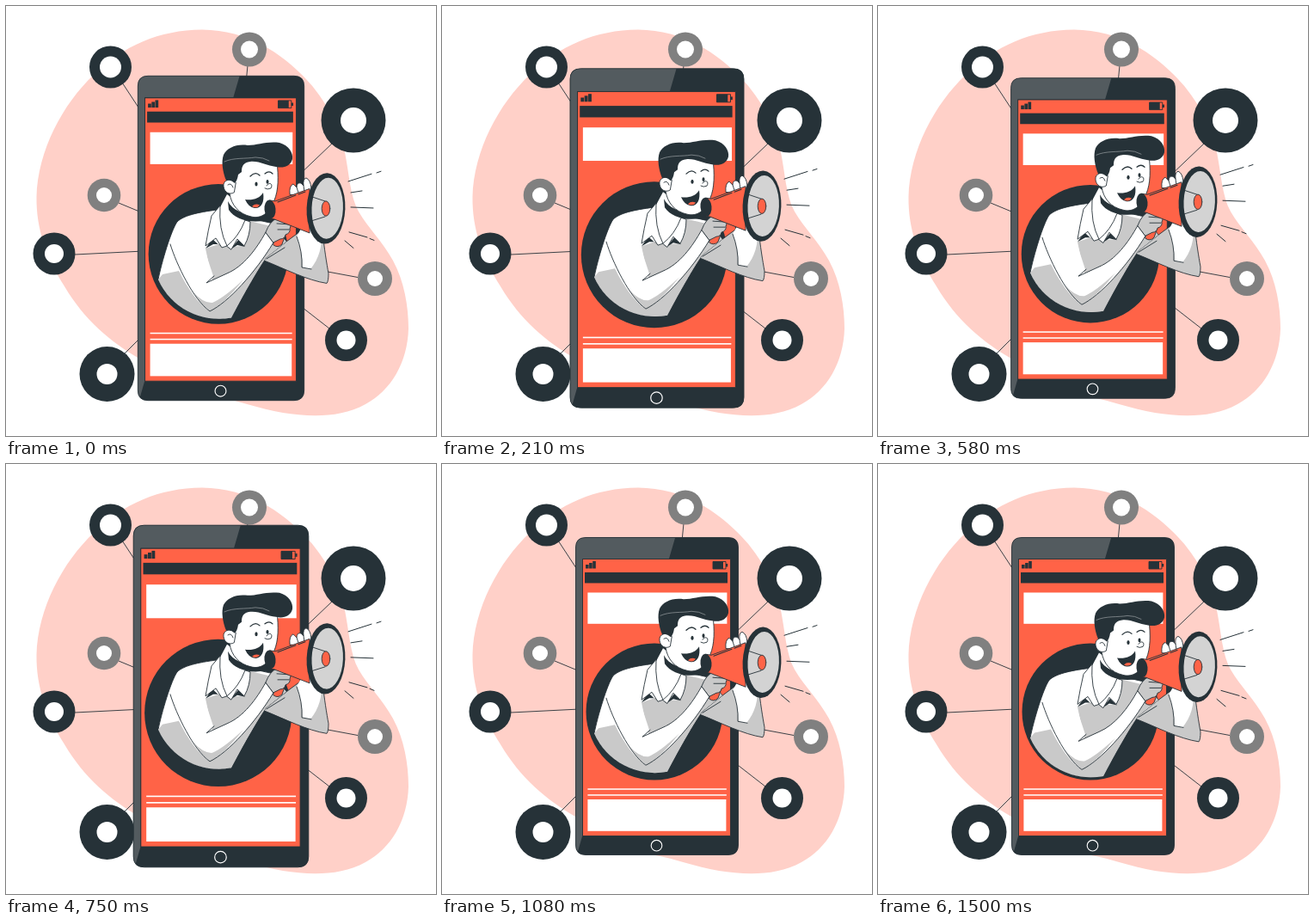
An HTML page with a canvas that plays this animation: 500 px wide and 500 px high, repeating every 1540 ms.

```html
<!DOCTYPE html>
<html lang="en">
<head>
<meta charset="utf-8">
<title>Mobile marketing</title>
<style>
  html, body { margin: 0; width: 100%; height: 100%; overflow: hidden; background: #fff; }
  canvas { display: block; width: 500px; height: 500px; }
</style>
</head>
<body>
<canvas id="stage" width="500" height="500"></canvas>
<script>
const ctx = document.getElementById('stage').getContext('2d');
const DARK = '#263238', ORANGE = '#ff6347', PINK = '#ffd0c8';
const GREY = '#808080', SHADE = '#c9c9c9', LIGHT = '#d3d3d3', WHITE = '#fff';
const LOOP = 1540, BEAT = 1500, LEAD = 33;

function shape(d, fill, stroke, width = 0.9) {
  const path = new Path2D(d);
  if (fill) { ctx.fillStyle = fill; ctx.fill(path); }
  if (stroke) { ctx.strokeStyle = stroke; ctx.lineWidth = width; ctx.stroke(path); }
}
const line = (d, color = DARK, width = 0.9) => shape(d, null, color, width);

function ellipse(x, y, rx, ry, fill, stroke, tilt = 0, width = 0.9) {
  ctx.beginPath();
  ctx.ellipse(x, y, rx, ry, tilt, 0, Math.PI * 2);
  if (fill) { ctx.fillStyle = fill; ctx.fill(); }
  if (stroke) { ctx.strokeStyle = stroke; ctx.lineWidth = width; ctx.stroke(); }
}
const disc = (x, y, r, fill) => ellipse(x, y, r, r, fill);

function box(x, y, w, h, fill) {
  ctx.fillStyle = fill;
  ctx.fillRect(x, y, w, h);
}

// x, y, radius, colour, radius of the inner disc
const badges = [
  [121.5, 71, 24.5, DARK, 12.5], [283, 50.5, 20, GREY, 10],
  [404, 133, 37.5, DARK, 15], [114, 220, 19.3, GREY, 9],
  [56, 288, 24.5, DARK, 11], [429, 317, 20, GREY, 9],
  [395.5, 388.5, 24.5, DARK, 11], [117.5, 428, 32, DARK, 12]
];

function drawBackground() {
  box(0, 0, 500, 500, WHITE);
  shape(`M35.5 222 C37 168 66 114 102 80 C137 46 178 28 228 27.5
    C282 28 320 55 348 84 C372 109 387 139 394 170 C399 195 400 221 410 239
    C421 258 437 273 450 296 C463 320 468 349 468 375
    C467 414 448 447 418 463 C389 479 354 478 322 473 C294 468 271 459 248 455
    C214 447 184 428 155 410 C122 391 91 365 68 326 C47 293 35 259 35.5 222Z`, PINK);
  line(`M135 89 L158 124 M281 69 L279 90 M379 160 L336 201 M131 229 L160 241
    M80 289 L160 285 M409 315.5 L366 307.5 M376 375 L340 347 M137 405 L162 380`);
  for (const [x, y, r, color, inner] of badges) {
    disc(x, y, r, color);
    disc(x, y, inner, WHITE);
  }
}

function drawPhone(scale) {
  ctx.save();
  ctx.translate(250, 270);
  ctx.scale(scale, scale);
  ctx.translate(-250, -270);
  shape(`M167 85.5 H333 Q344.5 85.5 344.5 97 V443 Q344.5 454.5 333 454.5 H167
    Q155.5 454.5 155.5 443 V97 Q155.5 85.5 167 85.5Z`, DARK, DARK);
  shape(`M167 86 H271 L264 110 H163 V433 L158 450.5
    Q156 448 156 443 V97 Q156 86 167 86Z`, '#535b5f');
  shape('M163.5 110.5 H335.5 V432.5 H163.5Z', ORANGE, DARK);

  for (let i = 0; i < 3; i++) box(167 + i * 4.1, 117 - i * 2, 3.6, 4.5 + i * 2, DARK);
  shape('M315 113.5 H330 V122 H315Z', null, DARK);
  box(315, 113.5, 12, 8.5, DARK);
  box(330, 116, 2.2, 3.5, DARK);

  box(166, 126, 166, 12.5, DARK);
  box(169.4, 149.5, 162, 36.3, WHITE);
  disc(247, 288, 79.5, DARK);
  box(169.4, 377.3, 161.4, 1.5, WHITE);
  box(169.4, 384.2, 161.4, 1.5, WHITE);
  box(169.4, 390, 161, 36.8, WHITE);
  ellipse(249.5, 443.7, 6.3, 6.3, null, WHITE, 0, 1.1);
  ctx.restore();
}

function drawBody() {
  // far arm
  shape(`M300 293 L326 274 L345 260 L368 262 C370 282 373 300 375 311
    Q375 320 373 322.5 C350 319 325 306 300 296Z`, SHADE, DARK);
  shape('M338 268 L344 257 L367 262 C368 279 364 294 354 306 L345 304 Q345 288 338 268Z', WHITE);
  line('M338 268 Q345 286 344 304 L355 306');
  // torso
  shape(`M246 237 C222 240 206 244 199 251 C192 261 181 298 177 318
    A77 77 0 0 0 262 362.5 C273 342 286 318 302 293 L326 274
    L311 253 L284 247Z`, WHITE, DARK);
  shape(`M232 282 L247 277 L257 280 L276 279 L283 250 L308 256 L326 274 L302 293
    C286 317 273 342 262 362.5 L236 361 L240 317 Q236 302 232 282Z`, SHADE);
  shape(`M177 318 L182 312 L201 308 C211 328 224 347 238 356 L250 349 L262 362.5
    A77 77 0 0 1 177 318Z`, SHADE);
  // near arm
  shape(`M191 277 C198 300 218 342 237 355 C258 345 290 310 311 275
    L302 263 C291 283 276 303 257 311 L233 322
    L241 314 C237 301 233 291 231 281 L206 263Z`, WHITE);
  shape('M218 333 Q230 346 240 345 Q254 339 276 318 C262 336 248 350 237 355 Q227 348 218 333Z', SHADE);
  line(`M191 277 C198 300 218 342 237 355 C258 345 290 310 311 275 L302 263
    C291 283 276 303 257 311 L233 322 L242 314`);
  line('M303 294 L324 281');
  // neck and collar
  shape('M257 219 L249 234 L244 243 L257 279 L279 250 L286 240Z', WHITE);
  shape('M232 282 L240 271 L251 281 L247 277 L241 277Z M261 283 L270 272 L278 280 L269 278Z', DARK);
  shape(`M249 232 L239 244 Q235 261 232 279 L244 270 L251 281 L257 279
    Q247 260 249 232Z`, WHITE, DARK);
  shape('M257 279 Q271 268 278 249 L284 251 Q284 267 277 279 L269 271 L262 283Z', WHITE, DARK);
  shape('M258 227 C264 239 280 245 305 243 L302 249.5 C283 253 266 248 259 237Z', DARK);
}

function drawHead() {
  shape(`M264 178 L315 181 C317 198 317 214 312 226 C307 241 296 248 285 245
    C271 242 262 232 260 218Z`, WHITE, DARK);
  shape('M267 205 C260 199 252 203 253 210 C254 217 260 220 265 217Z', WHITE, DARK);
  shape(`M256 203 C252 193 250 181 253 173 C257 165 268 160 281 162
    C293 162 303 157 318 159 C329 162 334 171 333 178 C331 186 323 189 314 187
    C303 186 295 180 284 181 C276 182 274 186 274 193 L270 196
    Q269 203 266 206 Q261 201 256 203Z`, DARK);
  line('M254 181 C265 176 279 178 290 176 Q299 176 306 180', '#9aa0a2', 0.7);
  ellipse(291, 207, 1.6, 2.5, DARK);
  ellipse(304, 204.5, 1.5, 2.4, DARK);
  line('M284 198 Q290 192 295 197 M301 195 Q306 191 310 195', DARK, 1.3);
  line('M303 209 C306 204 311 207 308 212 Q304 214 301 212');
  shape('M278 225 C287 226 295 224 299 217 C301 229 296 236 289 235 Q282 234 278 225Z', DARK);
  shape('M286 233 Q290 229 295 231.5 Q292 236 286 233Z', ORANGE);
  line('M258 208 Q262 205 264 211');
}

function drawMegaphone() {
  shape('M316 254 L328 257 L321 277 Q316 282 311 278Z', ORANGE, DARK);
  // gripping hand
  shape(`M302 263 Q307 250 315 247 L328 248 Q333 253 330 259 Q331 264 325 266
    Q324 271 319 271 L311 275Z`, SHADE, DARK);
  line('M315 253 L330 254 M316 260 L329 260');
  // supporting hand
  shape(`M330 219 Q329 209 334 207 L338 211 Q338 205 343 206 L346 209
    Q345 201 349 200 Q354 202 355 212 L351 220Z`, WHITE, DARK);
  line('M338 211 L340 217 M346 209 L347 216');
  shape('M307 226 L313 227 L353 212.5 L353 264 L312 248 L307 247Z', ORANGE, DARK);
  line('M316 228 L337 220 M340 219 L348 216', DARK, 1.1);
  ellipse(307, 236.5, 6.5, 11, DARK, null, -0.1);
  ellipse(372, 235.5, 22.4, 41.2, DARK, null, 0.04);
  ellipse(373.7, 235.3, 18.2, 35.5, LIGHT, null, 0.04);
  line('M356 222 L371 227 M355 250 L371 245');
  ellipse(372, 235.6, 4.8, 8.7, ORANGE, DARK);
  line(`M398 204 L425 195.3 M431 194 L436 192.3 M401 217 L414 215 M401 234 L427 235
    M399 263 L420 269 M423 270.5 L428 272.5 M394 273 L404 281.5`, DARK, 1);
}

// double heartbeat: [time in ms, scale]
const pulse = [[0, 1], [150, 1.1], [450, 1], [600, 1], [750, 1.1], [900, 1], [BEAT, 1]];

function pulseAt(t) {
  for (let i = 1; i < pulse.length; i++) {
    const [t0, s0] = pulse[i - 1], [t1, s1] = pulse[i];
    if (t <= t1) return s0 + (s1 - s0) * (t - t0) / (t1 - t0);
  }
  return 1;
}

function render(now) {
  const t = now % LOOP + LEAD;
  const e = t >= LOOP ? t - LOOP : Math.min(t, BEAT);
  const lift = 10 * (1 - Math.abs(1 - e / (BEAT / 2)));
  drawBackground();
  drawPhone(pulseAt(e));
  ctx.save();
  ctx.translate(0, 0.4 - lift);
  ctx.lineCap = ctx.lineJoin = 'round';
  drawBody();
  drawHead();
  drawMegaphone();
  ctx.restore();
}

const start = performance.now();
function tick() {
  render(performance.now() - start);
  requestAnimationFrame(tick);
}
tick();
</script>
</body>
</html>
```
